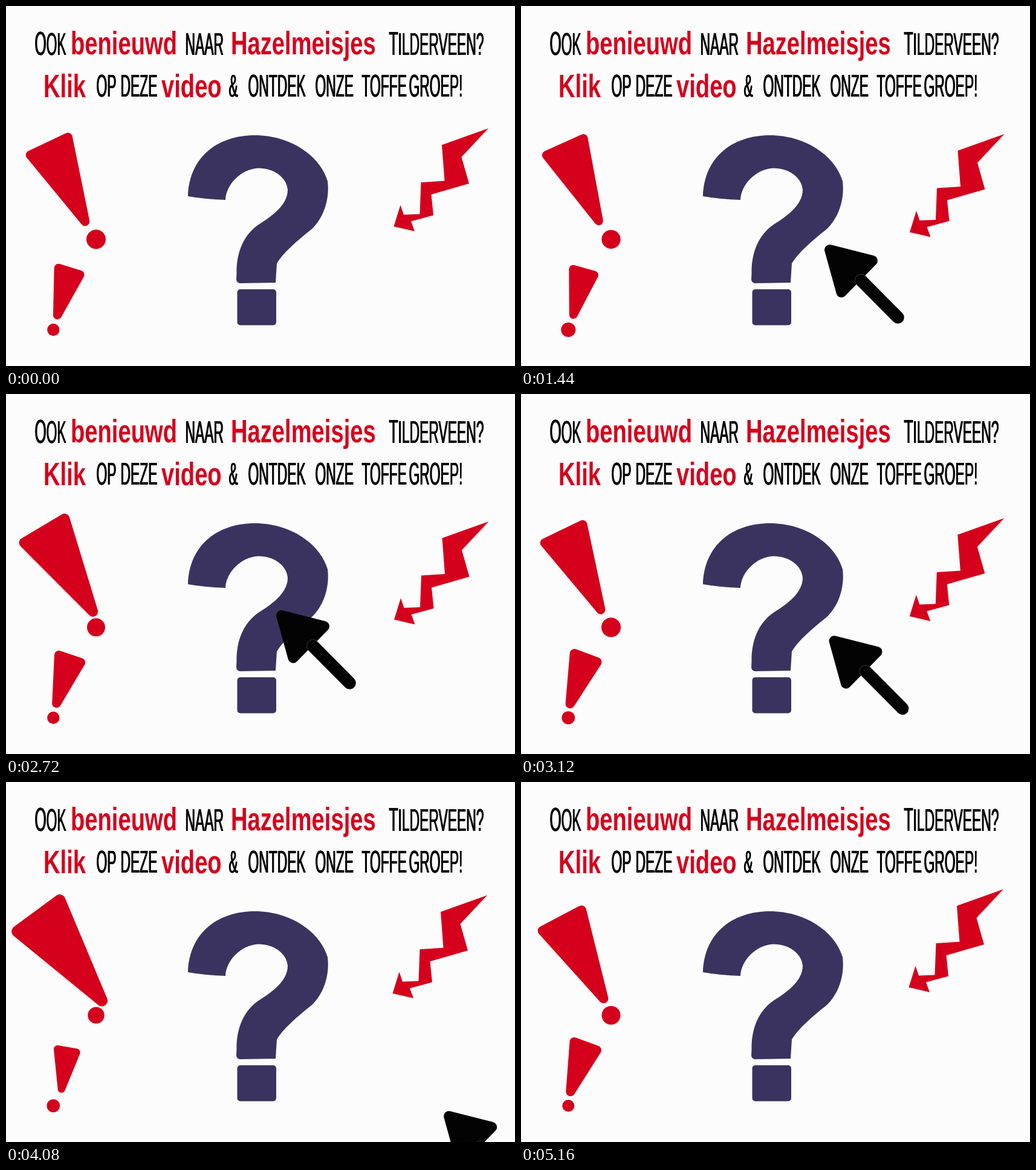
These frames come from a looping animation (842 px wide and 596 px high, 5.2 s). An HTML page with a canvas:

```html
<!DOCTYPE html>
<html lang="nl">
<head>
<meta charset="utf-8">
<style>
html, body { margin: 0; width: 842px; height: 596px; overflow: hidden; background: #fcfcfc; }
canvas { position: absolute; left: 0; top: 0; }
p { position: absolute; margin: 0; white-space: nowrap; transform-origin: 0 0;
    font-family: "Liberation Sans", Arial, sans-serif; }
/* two narrow lettering styles, one factor each */
.thin { font-size: 52px; line-height: 52px; color: #000; text-transform: uppercase;
        text-shadow: 2px 0 #000; transform: scaleX(.44); }
.cap::first-letter { font-size: 56px; }
.bold { font-size: 53px; line-height: 53px; font-weight: 700; color: #d5001c; transform: scaleX(.72); }
</style>
</head>
<body>
<canvas id="stage" width="842" height="596"></canvas>
<script>
const RED = '#d5001c', BLUE = '#3b335f', LOOP = 5200, STEP = 40;
const ctx = document.getElementById('stage').getContext('2d');

const words = [
  ['thin cap', 47, 36, 'Ook'], ['bold', 107, 35, 'benieuwd'], ['thin', 296, 37, 'naar'],
  ['bold', 372, 35, 'Hazelmeisjes'], ['thin cap', 633, 36, 'Tilderveen?'],
  ['bold', 62, 106, 'Klik'], ['thin', 149, 106, 'op'], ['thin', 189, 106, 'deze'],
  ['bold', 257, 106, 'video'], ['thin', 368, 106, '&'], ['thin', 400, 106, 'ontdek'],
  ['thin', 511, 106, 'onze'], ['thin', 588, 106, 'toffe'], ['thin', 666, 106, 'groep!']
];
for (const [cls, x, y, text] of words) {
  const p = document.createElement('p');
  p.className = cls;
  p.textContent = text;
  p.style.left = x + 'px';
  p.style.top = y + 'px';
  document.body.append(p);
}

// wobble channels: [time, value] pairs joined by smooth steps
const wobble = {
  big: [[0, .32], [440, .2], [880, .35], [1100, .43], [1400, .25], [1740, .46], [2000, .235],
    [2300, .3], [2720, .65], [2840, .59], [3480, 0], [3920, .85], [4080, 1], [4520, .41],
    [4800, .3], [5160, .47]],
  small: [[0, .59], [880, .94], [2000, 0], [2720, .7], [3480, 1], [4080, .06], [5160, .82]],
  bigDot: [[0, 16], [880, 13.7], [2000, 17.6], [2720, 15], [3480, 17], [4080, 13.7], [5160, 15.5]],
  smallDot: [[0, 10.2], [880, 11.7], [2000, 12.4], [2720, 10.2], [3480, 11.3], [4080, 10.8], [5160, 10]],
  boltX: [[0, 0], [880, 3], [2000, 0], [2720, .5], [3480, 2], [4080, -2], [5160, 0]],
  boltY: [[0, 0], [480, -11], [880, -3], [1160, 1], [1400, 10], [2000, -21], [2080, -23],
    [2720, 8.5], [3100, 3], [3480, 15], [4080, -15], [4160, -16], [4520, -9], [4800, 5],
    [5040, -10], [5160, -25]]
};

function value(name, t) {
  const keys = wobble[name];
  for (let i = 1; i < keys.length; i++) {
    const [t0, a] = keys[i - 1], [t1, b] = keys[i];
    if (t <= t1) {
      const p = (t - t0) / (t1 - t0);
      return a + (b - a) * p * p * (3 - 2 * p);
    }
  }
  return keys[keys.length - 1][1];
}

function poly(pts) {
  ctx.beginPath();
  pts.forEach(([x, y]) => ctx.lineTo(x, y));
  ctx.closePath();
}

function roundPoly(pts, r, color) {
  poly(pts);
  ctx.fillStyle = ctx.strokeStyle = color;
  ctx.lineJoin = 'round';
  ctx.lineWidth = 2 * r;
  ctx.fill();
  ctx.stroke();
}

function dot(x, y, r) {
  ctx.beginPath();
  ctx.arc(x, y, r, 0, 2 * Math.PI);
  ctx.fillStyle = RED;
  ctx.fill();
}

// wedge of an exclamation mark, grown and turned around its middle
function wedge(x, y, scale, degrees, pts, r) {
  ctx.save();
  ctx.translate(x, y);
  ctx.rotate(degrees * Math.PI / 180);
  ctx.scale(scale, scale);
  roundPoly(pts, r, RED);
  ctx.restore();
}

const BIG = [[-36, -40.5], [20.5, -61], [34, 62.5]];
const SMALL = [[-20, -33], [11, -28], [-12.5, 32]];
const BOLT = [[798, 202.5], [753.5, 250], [766, 294], [703.5, 312], [707, 346.5], [670, 356.5],
  [676, 373], [641.5, 365], [652.5, 329.5], [658, 345.5], [684.5, 344.5], [686.5, 292],
  [725.5, 289.5], [721, 230]];
const MARK = new Path2D('M301 315C303 250 350 214 412 214C470 214 520 248 532 290' +
  'C536 322 524 353 505 370C480 390 460 407 448 426L446 458L387 459Q381 458 381 452L381.5 442' +
  'C381 410 392 379 419 361C445 345 466 327 466 304C464 283 442 268 417 268.5' +
  'C388 270 364 296 363 321Q330 320 301 315Z');
MARK.roundRect(382.5, 469, 64.5, 59.5, 5);

function question(t) {
  const p = Math.min(1, Math.max(0, (t - 2240) / 440));
  const s = 1 + .318 * Math.sin(Math.PI * p);
  ctx.save();
  ctx.translate(417, 368);
  ctx.scale(s, s);
  ctx.translate(-417, -368);
  ctx.fillStyle = BLUE;
  ctx.fill(MARK);
  ctx.restore();
}

function pointer(t) {
  const dx = t < 1540 ? .55 * (1540 - t) : Math.max(0, t - 2840) * .2235;
  ctx.save();
  ctx.translate(dx, dx * .674);
  roundPoly([[455.5, 366.5], [526.5, 384.5], [475, 437]], 8.5, '#030303');
  ctx.lineCap = 'round';
  for (const [width, color] of [[21, '#444'], [19.6, '#030303']]) {
    ctx.beginPath();
    ctx.moveTo(507.5, 417);
    ctx.lineTo(568.5, 478.5);
    ctx.lineWidth = width;
    ctx.strokeStyle = color;
    ctx.stroke();
  }
  ctx.restore();
}

function draw(t) {
  ctx.fillStyle = '#fcfcfc';
  ctx.fillRect(0, 0, 842, 596);

  const u = value('big', t), v = value('small', t);
  wedge(85.5, 289, 1 + .453 * u, -16.5 * u, BIG, 6.5);
  dot(149, 386.3, value('bigDot', t));
  wedge(105, 476, 1 + .32 * v, 13.3 * v, SMALL, 6);
  dot(78.3, 536, value('smallDot', t));

  ctx.save();
  ctx.translate(value('boltX', t), value('boltY', t));
  poly(BOLT);
  ctx.fillStyle = RED;
  ctx.fill();
  ctx.restore();

  question(t);
  pointer(t);
}

const start = performance.now();
function frame() {
  const t = (performance.now() - start) % LOOP;
  draw(Math.floor(t / STEP) * STEP);
  requestAnimationFrame(frame);
}
frame();
</script>
</body>
</html>
```
